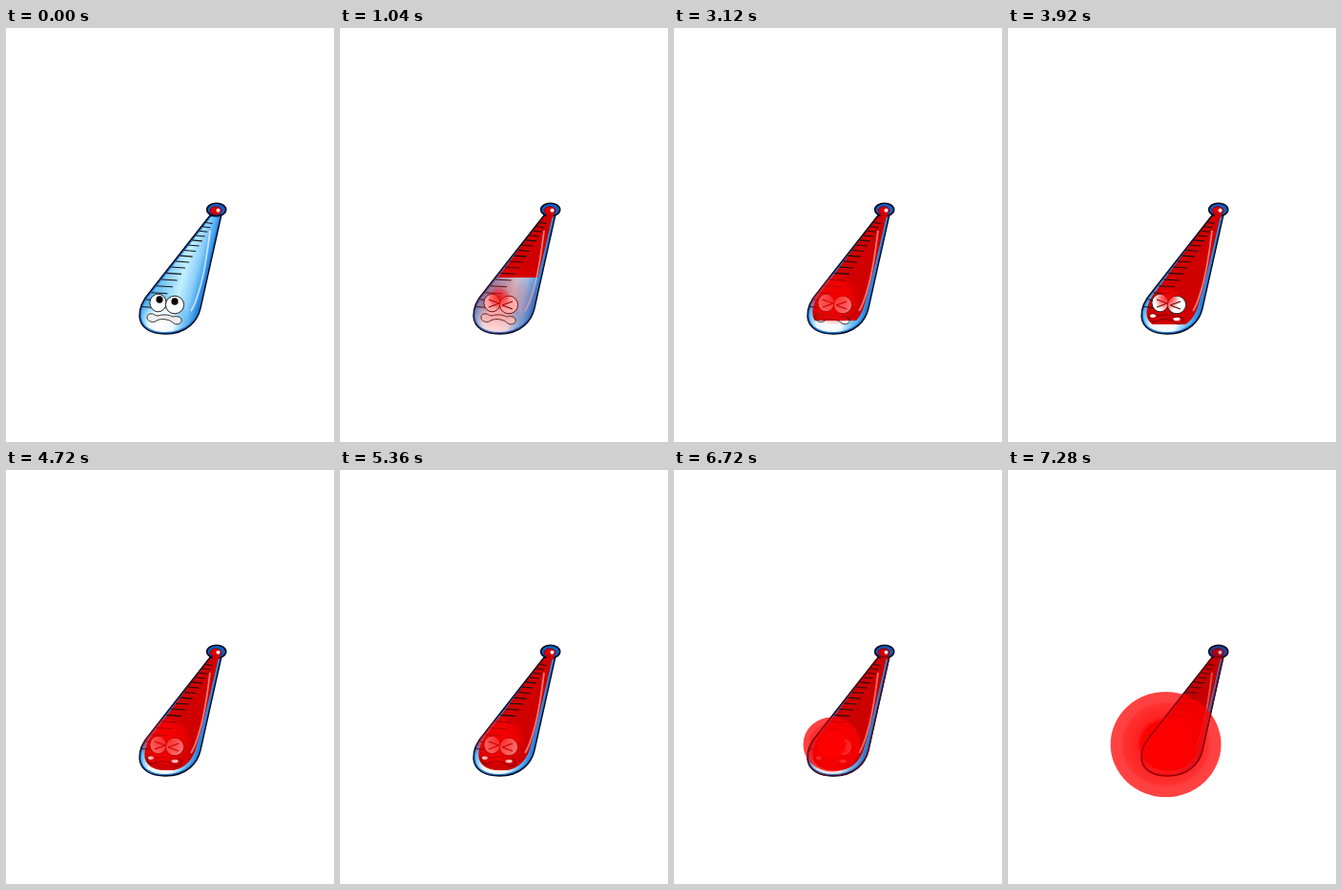
An HTML page with a canvas that plays this animation: 344 px wide and 433 px high, repeating every 7360 ms.

```html
<!DOCTYPE html>
<html lang="en">
<head>
<meta charset="utf-8">
<title>Thermometer</title>
<style>
html, body { margin: 0; width: 100%; height: 100%; overflow: hidden; background: #fff; }
canvas { display: block; width: 344px; height: 433px; }
</style>
</head>
<body>
<canvas id="stage" width="344" height="433"></canvas>
<script>
const ctx = document.getElementById('stage').getContext('2d');
const LOOP = 7360, STEP = 80, BURST = 6480;
const body = new Path2D('M214 196 L151 276 C142 286 139.5 294 140 302 C141 314 152 320 167 320 C190 320 201 306 204 293 L226 195 Z');
const tube = new Path2D('M215 194 L153 278 C147 286 144 296 146 303 C149 311 158 314.5 170 314.5 C187 314 195 304 199 292 Q208 262 223.5 194 Z');
const mouth = new Path2D('M151 299 C155 298 156 301 159 301 C166 299 171 300 175 302 C179 301 184 302 184 305 C185 309 180 311 176 309 C173 305 163 303 158 306 C155 309 148 307 148 303 C148 301 149 299 151 299 Z');
const shine = new Path2D('M214 212 C211 236 208 257 203 273 Q199 288 194 296');
const levelKeys = [[0, 192], [1040, 261], [1920, 296], [3120, 306], [4720, 314], [7360, 315]];

function levelAt(t) {
  const i = levelKeys.findIndex(([time]) => time > t);
  const [t0, y0] = levelKeys[i - 1], [t1, y1] = levelKeys[i];
  return y0 + (y1 - y0) * (t - t0) / (t1 - t0);
}

function ellipse(x, y, rx, ry, fill, stroke, width = 1) {
  ctx.beginPath();
  ctx.ellipse(x, y, rx, ry, 0, 0, Math.PI * 2);
  paint(fill, stroke, width);
}

function paint(fill, stroke, width) {
  if (fill) { ctx.fillStyle = fill; ctx.fill(); }
  if (stroke) { ctx.strokeStyle = stroke; ctx.lineWidth = width; ctx.stroke(); }
}

function strokePath(path, color, width = 1) {
  ctx.strokeStyle = color;
  ctx.lineWidth = width;
  ctx.stroke(path);
}

function gradient(g, stops) {
  stops.forEach(([at, color]) => g.addColorStop(at, color));
  return g;
}

function clipped(path, draw) {
  ctx.save();
  ctx.clip(path);
  draw();
  ctx.restore();
}

function drawGlass() {
  clipped(body, () => {
    ctx.fillStyle = gradient(ctx.createLinearGradient(160, 250, 213, 264), [
      [0, '#58b4f0'], [.25, '#8fd2fa'], [.5, '#c0f0ff'], [.72, '#8ccffb'], [.88, '#3b9cec'], [1, '#075fc4']]);
    ctx.fillRect(130, 185, 100, 140);
    ctx.fillStyle = gradient(ctx.createRadialGradient(162, 311, 2, 164, 305, 27), [
      [0, '#fff'], [.45, '#eef9ff'], [.75, 'rgba(130,205,250,.7)'], [1, 'rgba(50,150,235,0)']]);
    ctx.fillRect(130, 275, 80, 50);
    strokePath(body, '#2a80d8', 4);
  });
}

function drawFill(t) {
  const level = levelAt(t);
  ctx.fillStyle = '#d00000';
  clipped(tube, () => ctx.fillRect(130, 185, 100, level - 185));
}

function drawTicks() {
  ctx.beginPath();
  for (let i = 0; i < 16; i++) {
    const k = i / 15;
    const y = 204 + 62 * k + 26 * k * k;
    const x = Math.max(141, 215 - (y - 197) * .78);
    ctx.moveTo(x, y - .5);
    ctx.lineTo(x + 7 + 10 * Math.min(1, k * 1.3), y + .5);
  }
  clipped(body, () => paint(null, '#141414', 1.1));
}

function drawEyes(closed) {
  ellipse(159.5, 287.5, 8.6, 9.3, '#fff', '#222');
  ellipse(177, 289.5, 9.6, 9.3, '#fff', '#222');
  if (closed) {
    ctx.beginPath();
    for (const [x, y, dir] of [[167, 288, -1], [170, 290, 1]]) {
      for (const dy of [-4, 4]) {
        ctx.moveTo(x, y);
        ctx.lineTo(x + dir * 11, y + dy);
      }
    }
    paint(null, '#300', 1.1);
  } else {
    ellipse(161, 284, 3.6, 3.8, '#000');
    ellipse(177, 286, 3.6, 3.8, '#000');
  }
}

function drawBulb(t) {
  ellipse(220.7, 190, 10, 6.7, '#1263c5', '#020a20', 1.6);
  ellipse(220, 191, 6, 4.2, '#e00000', '#7d0018');
  if (t > 0) {
    ctx.fillStyle = '#d00000';
    ctx.fillRect(216.5, 193, 7.5, 5);
  }
  ellipse(222.5, 190.8, 2, 2, '#fff');
}

function drawPulse(t) {
  const beat = .5 - .5 * Math.cos(t / 560 * Math.PI * 2);
  const core = 6 + 14 * beat;
  const reach = t < 2400 ? 48 : core + 8;
  const rgb = a => `rgba(255,0,0,${a * Math.min(1, t / 500)})`;
  clipped(body, () => {
    ctx.fillStyle = gradient(ctx.createRadialGradient(167, 282, 0, 167, 283, reach), [
      [0, rgb(.85)], [core / reach, rgb(.6)], [Math.min(.98, (core + 3) / reach), rgb(.38)], [1, rgb(0)]]);
    ctx.fillRect(105, 220, 125, 110);
  });
}

function drawBurst(t) {
  const r = 58 - (7280 - t) / 20;
  const progress = (t - BURST) / 800;
  ctx.save();
  ctx.globalAlpha = .3 * progress;
  ctx.fillStyle = '#b00000';
  ctx.fill(body);
  ellipse(220.7, 190, 10, 6.7, '#500030');
  ctx.restore();
  ctx.save();
  ctx.translate(165.5, 287);
  ctx.scale(1, .95);
  ellipse(0, 0, r, r, gradient(ctx.createRadialGradient(0, 0, 0, 0, 0, r), [
    [0, '#f00'], [.44, '#f00'], [.52, 'rgba(255,0,0,.87)'], [.76, 'rgba(255,0,0,.81)'],
    [.82, 'rgba(255,0,0,.75)'], [1, 'rgba(255,0,0,.74)']]));
  ctx.restore();
  strokePath(body, 'rgba(105,0,12,.8)', 1.2);
}

function render(t) {
  ctx.fillStyle = '#fff';
  ctx.fillRect(0, 0, 344, 433);
  drawGlass();
  ctx.fillStyle = '#eee';
  ctx.fill(mouth);
  drawFill(t);
  drawTicks();
  strokePath(shine, t ? 'rgba(255,190,190,.65)' : 'rgba(255,255,255,.65)', 1.8);
  strokePath(mouth, t > 3600 ? 'rgba(60,0,0,.6)' : '#333');
  if (t > 3600) {
    ellipse(152, 301, 3, 1.8, '#fff');
    ellipse(177, 304.5, 3.6, 1.7, '#fff');
  }
  drawEyes(t >= 800);
  strokePath(body, '#020a20', 1.4);
  drawBulb(t);
  if (t >= BURST) drawBurst(t);
  else drawPulse(t);
}

function tick() {
  render(Math.floor(performance.now() % LOOP / STEP) * STEP);
  requestAnimationFrame(tick);
}
tick();
</script>
</body>
</html>
```
